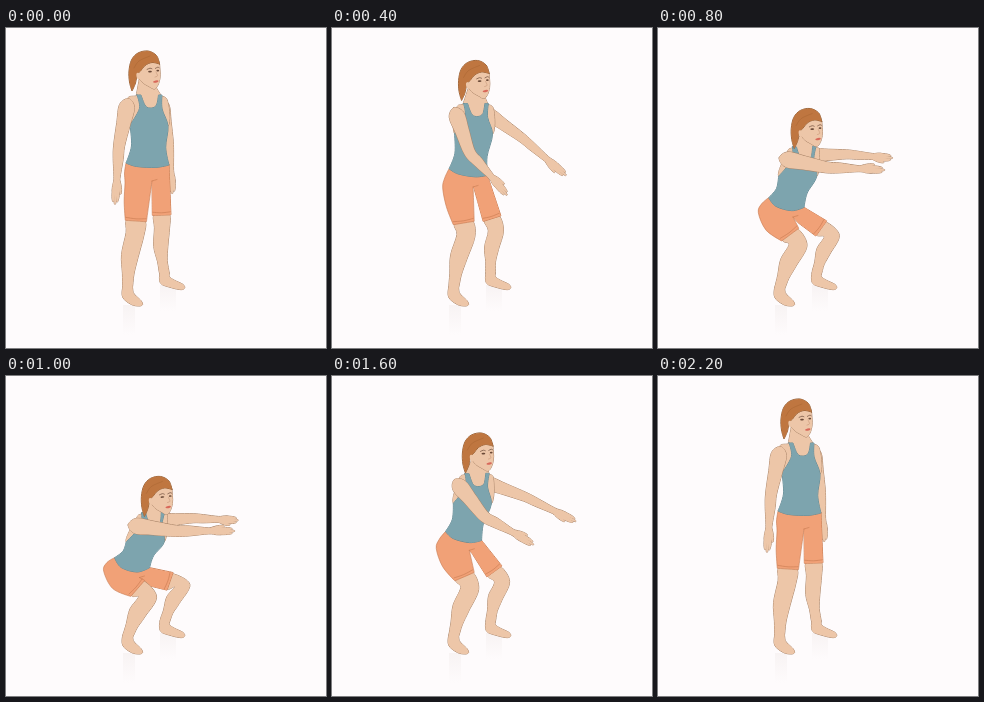
An HTML page with a canvas for the animation above (2300 ms loop, 320x320 px).

```html
<!DOCTYPE html>
<html lang="en">
<head>
<meta charset="utf-8">
<title>Squat exercise</title>
<style>
html, body { margin: 0; width: 100%; height: 100%; overflow: hidden; background: #fefbfc; }
canvas { display: block; width: 320px; height: 320px; }
</style>
</head>
<body>
<canvas id="stage"></canvas>
<script>
const canvas = document.getElementById('stage');
const ctx = canvas.getContext('2d');
const ratio = window.devicePixelRatio || 1;
canvas.width = canvas.height = 320 * ratio;

const SKIN = '#edc6a8', TOP = '#7da4ae', SHORTS = '#f1a177', HAIR = '#bf7640';
const LINE = '#a98468', SEAM = '#c77a50', LASH = '#6b4a38';
const LOOP = 2300, STEP = 100;

const clamp = v => Math.max(0, Math.min(1, v));
const ease = v => { const u = clamp(v); return u * u * (3 - 2 * u); };

// Timing: how deep the squat is and how far the arms are raised, both 0 to 1.
const depthAt = t => t < 1300 ? ease((t - 200) / 950) : (1 - clamp((t - 1300) / 900)) ** 2.2;
const raiseAt = t => t < 1300 ? ease(t / 900) : 1 - ease((t - 1300) / 720);

// Standing place, then travel with the depth and with the early bend of the hips.
const rig = {
  head: { at: [0, 0], sink: [5, 83], bend: [8, 0] },
  near: { at: [121, 78], sink: [0, 77], bend: [9, 0] },
  far: { at: [157, 78], sink: [-1, 71], bend: [0, 0] },
  strapN: { at: [133, 67], sink: [5, 75], bend: [0, 0] },
  strapF: { at: [154, 67], sink: [3, 74], bend: [0, 0] },
  pit: { at: [124, 97], sink: [0, 74], bend: [-4, 0] },
  bust: { at: [162, 98], sink: [0, 73], bend: [-4, 0] },
  backW: { at: [120, 135], sink: [-6, 50], bend: [-6, 0] },
  frontW: { at: [163, 137], sink: [0, 44], bend: [-20, 14] },
  hip: { at: [119, 155], sink: [0, 43], bend: [-22, 0] },
  crotch: { at: [146, 153], sink: [0, 52], bend: [-13, 0] },
  kneeN: { at: [129, 206], sink: [0, 16], bend: [13, 0] },
  kneeF: { at: [156, 200], sink: [0, 3], bend: [21, 7] }
};

function poseAt(depth) {
  const bend = depth ** 0.45, pose = {};
  for (const name in rig) {
    const r = rig[name];
    pose[name] = r.at.map((v, i) => v + r.sink[i] * depth + r.bend[i] * bend);
  }
  return pose;
}

const mix = (a, b, k) => [a[0] + (b[0] - a[0]) * k, a[1] + (b[1] - a[1]) * k];
const add = (p, x, y) => [p[0] + x, p[1] + y];
const corner = p => [p[0], p[1], 1];
function unit(a, b) {
  const x = b[0] - a[0], y = b[1] - a[1], n = Math.hypot(x, y) || 1;
  return [x / n, y / n];
}
// Point on the way from a to b, pushed sideways.
function bulge(a, b, k, out) {
  const d = unit(a, b);
  return add(mix(a, b, k), -d[1] * out, d[0] * out);
}

// Smooth path; a third value on a point makes it a corner.
function spline(pts, closed = true) {
  const path = new Path2D(), n = pts.length;
  const at = i => closed ? pts[(i + n) % n] : pts[Math.max(0, Math.min(n - 1, i))];
  const pull = i => {
    const p = at(i), q = at(i + 1), o = at(i - 1);
    return p[2] ? [0, 0] : [(q[0] - o[0]) / 6, (q[1] - o[1]) / 6];
  };
  path.moveTo(pts[0][0], pts[0][1]);
  for (let i = 0; i < (closed ? n : n - 1); i++) {
    const p = at(i), q = at(i + 1), s = pull(i), e = pull(i + 1);
    path.bezierCurveTo(p[0] + s[0], p[1] + s[1], q[0] - e[0], q[1] - e[1], q[0], q[1]);
  }
  if (closed) path.closePath();
  return path;
}

// Tapered tube around a centre line of [x, y, half width].
function limb(pts) {
  const left = [], right = [], n = pts.length - 1;
  pts.forEach((p, i) => {
    const d = unit(pts[Math.max(0, i - 1)], pts[Math.min(n, i + 1)]);
    left.push(add(p, d[1] * p[2], -d[0] * p[2]));
    right.unshift(add(p, -d[1] * p[2], d[0] * p[2]));
  });
  const s = unit(pts[1], pts[0]), e = unit(pts[n - 1], pts[n]);
  const first = add(pts[0], s[0] * pts[0][2], s[1] * pts[0][2]);
  const last = add(pts[n], e[0] * pts[n][2], e[1] * pts[n][2]);
  return spline([first, ...left, last, ...right]);
}

function stroke(path, color = LINE, width = 0.6) {
  ctx.strokeStyle = color;
  ctx.lineWidth = width;
  ctx.stroke(path);
}
function fill(path, color) {
  ctx.fillStyle = color;
  ctx.fill(path);
}
// One outline around several overlapping parts.
function body(paths, color, line = LINE) {
  paths.forEach(p => stroke(p, line, 1));
  paths.forEach(p => fill(p, color));
}
function ellipse(x, y, rx, ry, color, turn = 0) {
  const p = new Path2D();
  p.ellipse(x, y, rx, ry, turn, 0, 7);
  fill(p, color);
}

function arm(shoulder, degrees, reach, bend, size, side) {
  const a = degrees * Math.PI / 180, c = Math.cos(a), s = Math.sin(a);
  const tip = add(shoulder, c * reach, s * reach);
  const elbow = bulge(shoulder, tip, 0.41, bend), wrist = bulge(shoulder, tip, 0.74, bend * 0.4);
  const d = unit(wrist, tip), len = reach * 0.26;
  const hand = (along, out) => add(wrist, d[0] * along * len + d[1] * out * side, d[1] * along * len - d[0] * out * side);
  const parts = [
    limb([[...shoulder, 7.6 * size], [...mix(shoulder, elbow, 0.45), 6.8 * size], [...elbow, 5.5 * size],
      [...mix(elbow, wrist, 0.4), 5 * size], [...wrist, 3], [...hand(0.3, 0), 3.8], [...hand(0.52, 0), 3.4]]),
    limb([[...hand(0.1, 1.5), 1.8], [...hand(0.36, 4), 1.3], [...hand(0.56, 4.8), 0.8]])
  ];
  for (const k of [-1, 0, 1]) {
    parts.push(limb([[...hand(0.42, k * 2), 1.6], [...hand(0.72, k * 2.2), 1.3], [...hand(0.97 - Math.abs(k) * 0.09, k * 2), 0.7]]));
  }
  body(parts, SKIN);
}

function leg(hem, knee, ankle, size, foot) {
  const shin = (k, back) => add(mix(knee, ankle, k), -back, 0);
  body([
    limb([[...hem, 9.6 * size], [...knee, 9 * size], [...shin(0.4, 2.2), 8.4 * size],
      [...shin(0.72, 1.4), 5.8 * size], [...ankle, 4.5]]),
    limb(foot)
  ], SKIN);
}

function hemOf(hip, knee, half) {
  const d = unit(hip, knee);
  const at = (back, out) => add(knee, -d[0] * back + d[1] * out, -d[1] * back - d[0] * out);
  return {
    mid: at(13, 0), front: at(13, half), back: at(13, -half),
    seam: spline([at(16, half - 0.5), at(15.2, 0), at(16, 0.5 - half)], false)
  };
}

function head(x, y) {
  ctx.save();
  ctx.translate(x, y);
  body([spline([[133, 36], [142, 29], [152, 32], [154, 42], [154, 50], [152, 57], [148.5, 61], [143, 58.5], [136, 54], [132, 47]])], SKIN);
  body([spline([[153.5, 36, 1], [150.5, 27.5], [142, 23], [132, 25], [125.5, 32], [123, 43], [123.5, 54], [126, 63, 1],
    [129.5, 55], [131, 46, 1], [134.5, 43], [139, 37.5], [146, 34.5]])], HAIR, '#8f5d35');
  stroke(spline([[128, 40], [133, 33], [144, 28]], false), '#a3602f', 0.4);
  ellipse(132.4, 48, 1.9, 3.4, SKIN, -0.2);
  for (const [ex, ey, w] of [[144, 43.6, 1.9], [151.8, 42.6, 1.4]]) {
    stroke(spline([[ex - w - 1, ey - 2.2], [ex, ey - 3.4], [ex + w, ey - 2.8]], false), LASH, 0.7);
    ellipse(ex, ey, w, 0.8, LASH, -0.1);
  }
  stroke(spline([[150, 44], [151.5, 47.8], [149, 49]], false), '#bd8a6c', 0.5);
  ellipse(149.8, 53.6, 2.8, 1.1, '#d8685a', -0.18);
  ctx.restore();
}

function reflection(x, y, w, h) {
  const g = ctx.createLinearGradient(0, y, 0, y + h);
  g.addColorStop(0, 'rgba(205,190,185,.13)');
  g.addColorStop(1, 'rgba(205,190,185,0)');
  ctx.fillStyle = g;
  ctx.fillRect(x, y, w, h);
}

function shorts(p, depth) {
  const hemN = hemOf(mix(p.hip, p.crotch, 0.5), p.kneeN, 10.6);
  const hemF = hemOf(mix(p.frontW, p.crotch, 0.5), p.kneeF, 9.3);

  leg(hemF.mid, p.kneeF, [158.5, 246], 0.84, [[158.5, 244, 4.3], [159, 252, 5.5], [167, 256, 4], [176, 259, 2.8]]);
  body([spline([p.frontW, hemF.front, hemF.back, add(p.crotch, 7 * depth, 8 * depth), p.crotch,
    mix(p.backW, p.frontW, 0.3)].map(corner))], SHORTS, SEAM);
  stroke(hemF.seam, SEAM);

  leg(hemN.mid, p.kneeN, [121.5, 261], 1, [[121.5, 258, 4.5], [122, 267, 5.8], [128, 272.5, 4.8], [134, 275.5, 2.8]]);
  const edge = [corner(p.backW), bulge(p.backW, p.hip, 0.5, 1 + 2 * depth), p.hip,
    bulge(p.hip, hemN.back, 0.5, 1 + 6 * depth), corner(hemN.back), corner(hemN.front), corner(p.crotch)];
  fill(spline([...edge, corner(mix(p.backW, p.frontW, 0.75))]), SHORTS);
  stroke(spline(edge, false), SEAM);
  stroke(spline([p.crotch, add(p.crotch, 5, -1.5)], false), SEAM);
  stroke(hemN.seam, SEAM);
}

function torso(p, depth) {
  const { strapN, strapF, pit, bust, backW, frontW } = p;
  const scoop = add(mix(strapN, strapF, 0.5), 2, 13);
  body([
    spline([add(strapN, -2, 1), add(p.near, 0, -6), pit, mix(pit, bust, 0.5), bust, add(p.far, 5, -3), add(strapF, 1, 1)]),
    spline([add(p.head, 134, 47), add(strapN, -3, 2), scoop, add(strapF, 2, 2), add(p.head, 148, 56)].map(corner))
  ], SKIN);
  const waist = k => mix(mix(pit, backW, 0.55), mix(bust, frontW, 0.55), k);
  const sag = 3 + 5 * depth;
  body([spline([
    corner(add(strapN, -2, 0)), add(mix(strapN, pit, 0.45), 4.5, 0), corner(pit), waist(0.09), corner(backW),
    bulge(backW, frontW, 0.25, sag), bulge(backW, frontW, 0.7, sag), corner(frontW), waist(0.93), bust,
    add(mix(strapF, bust, 0.45), -1.5, 0), corner(add(strapF, 2, 0)), corner(add(strapF, -1.5, 0)),
    add(scoop, 5, -3), scoop, add(scoop, -6, -2), corner(add(strapN, 2, 0))
  ])], TOP, '#628791');
}

function draw(t) {
  const depth = depthAt(t), raise = raiseAt(t), arc = Math.sin(Math.PI * raise);
  const p = poseAt(depth);
  ctx.setTransform(ratio, 0, 0, ratio, 0, 0);
  ctx.fillStyle = '#fefbfc';
  ctx.fillRect(0, 0, 320, 320);
  ctx.lineCap = ctx.lineJoin = 'round';
  reflection(117, 277, 12, 30);
  reflection(154, 257, 16, 26);

  arm(p.far, 84 * (1 - raise ** 0.7), 88 - 12 * raise + 16 * arc, -2, 0.82, -1);
  shorts(p, depth);
  torso(p, depth);
  head(...p.head);
  arm(p.near, 97 - 94 * raise, 99 - 4 * arc, 3 + 6 * arc, 1, 1);
}

const start = performance.now();
function tick() {
  const t = (performance.now() - start) % LOOP;
  draw(Math.floor(t / STEP) * STEP);
  requestAnimationFrame(tick);
}
tick();
</script>
</body>
</html>
```
